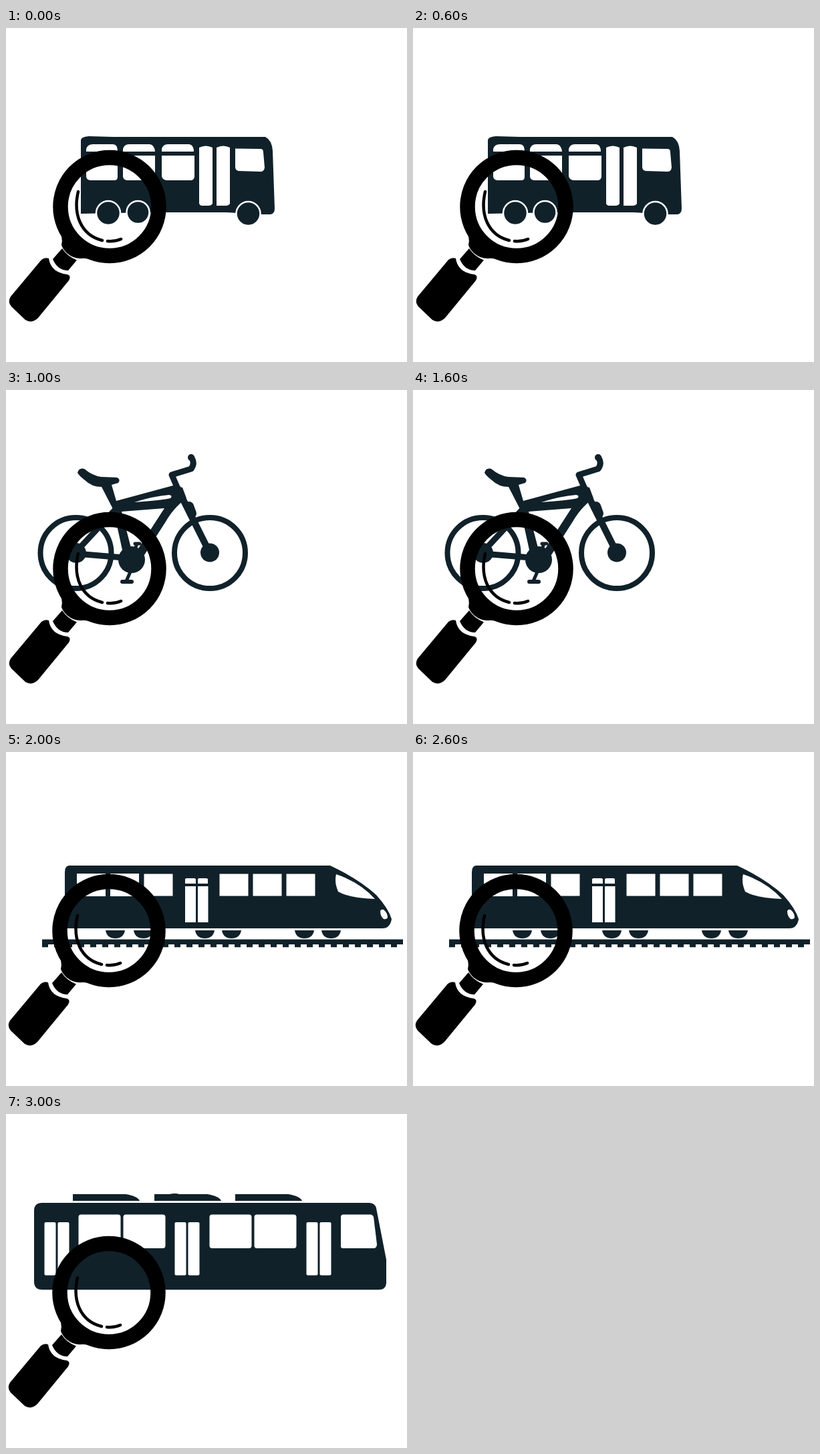
An HTML page that plays this animation: 600x500 px, repeating every 4 s.

```html
<!DOCTYPE html>
<html lang="en">
<head>
<meta charset="utf-8">
<title>Vehicle search</title>
<style>
  html, body { margin: 0; width: 100%; height: 100%; overflow: hidden; background: #fff; }
  svg { display: block; width: 600px; height: 500px; }
  .scene { fill: #11212a; visibility: hidden; }
  .w { fill: #fff; }
  .line { fill: none; stroke: #11212a; stroke-linecap: round; stroke-linejoin: round; }
</style>
</head>
<body>
<svg viewBox="0 0 600 500">
  <g class="scene" id="bus">
    <path d="M112 168Q112 163 124 162L160 163H388Q398 168 399 184L402 270Q402 278 396 279H380L330 276H215L112 278Z"/>
    <g class="w">
      <path d="M120 185V181Q122 174 130 174H160Q167 174 167 185ZM175 185V181Q177 174 184 174H215Q222 175 223 185ZM233 185V181Q235 174 242 174H274Q281 175 281 185Z"/>
      <path d="M120 191H167V223Q167 228 162 228H126Q120 227 120 222ZM175 191H223V223Q223 228 218 228H181Q175 227 175 222ZM233 191H282V223Q281 228 276 228H240Q234 227 233 222Z"/>
      <path d="M289 179Q299 174 309 179V263Q307 266 303 266H293Q289 265 289 262ZM315 179Q325 174 335 179V263Q333 266 329 266H315Z"/>
      <path d="M343 180.500L381 181Q385 181 385 186L387 209Q386 215 381 215L348 214Q343 213 343 208Z"/>
    </g>
    <g stroke="#fff" stroke-width="2.500">
      <circle cx="153" cy="277" r="18"/>
      <circle cx="197.500" cy="276" r="17"/>
      <circle cx="362.500" cy="278" r="18"/>
    </g>
  </g>

  <g class="scene" id="bike">
    <g class="line" stroke-width="8">
      <circle cx="104.500" cy="244" r="53"/>
      <circle cx="305" cy="244" r="53"/>
      <path d="M105 245L188 252M105 242L170 172" stroke-width="9"/>
      <path d="M278 102Q283 110 277 118L248 127L258 150" stroke-width="9"/>
      <path d="M257 148L303 240" stroke-width="10"/>
      <path d="M274 174L278 185" stroke-width="14"/>
      <path d="M193 230H200M195 233L190 245M187 270L180 286" stroke-width="5"/>
      <path d="M174 287H188" stroke-width="6"/>
    </g>
    <circle cx="277" cy="101" r="5"/>
    <path d="M107 124Q109 116 117 118Q129 128 142 130L166 131Q172 134 168 139L158 142L165 166L250 143L264 146L270 162Q251 176 239 197L207 247L195 242L237 177L173 182L188 240L175 244L161 180L143 145Q128 145 118 135Q109 128 107 124Z"/>
    <path class="w" d="M192 168Q220 159 244 157Q250 158 246 162Q234 165 192 168Z"/>
    <circle cx="105" cy="244" r="15"/>
    <circle cx="305" cy="243.500" r="14"/>
    <ellipse cx="188" cy="254" rx="20" ry="20"/>
  </g>

  <g class="scene" id="train">
    <path d="M94 170H485Q528 190 554 214Q572 234 577 250Q575 264 563 264H88V180Q88 171 94 170Z"/>
    <g class="w">
      <path d="M106 182H149V216H106ZM156 182H199V216H156ZM206.500 182.500H249.500V215.500H206.500ZM319.500 182.500H362.500V215.500H319.500ZM369.500 182.500H412.500V215.500H369.500ZM419.500 182.500H462.500V215.500H419.500Z"/>
      <path d="M268 197V190L270 189H282L284 190V197ZM287 197V190L289 189H300L302 190V197ZM268 201H284V255H268ZM287 201H302.500V255H287Z"/>
      <path d="M494 183Q530 195 552 220Q514 219 497 209Q491 195 494 183Z"/>
      <path d="M560 238Q561 235 565 236Q571 241 571 248Q569 251 565 250Q560 246 560 238Z"/>
    </g>
    <path id="axles"/>
    <path d="M54 280.500H594V288H54Z"/>
    <path d="M54 290H594" fill="none" stroke="#11212a" stroke-width="4.500" stroke-dasharray="9"/>
  </g>

  <g class="scene" id="tram">
    <path d="M54 133H543Q552 133 554 141L569 218V252Q569 263 558 263H54Q42 263 42 251V145Q42 133 54 133Z"/>
    <path d="M100 120H179Q197 123 200 130H100ZM222 120H245Q252 118 259 120H301Q319 123 322 130H222ZM343 120H422Q440 123 443 130H343Z"/>
    <g class="w" id="panes">
      <path d="M504 150.500H546Q549 151 550 154L555 195Q555 200 551 201H504Q501 201 501 198V154Q501 151 504 150.500Z"/>
    </g>
  </g>

  <g id="lens">
    <circle cx="155" cy="267.500" r="73.500" fill="none" stroke="#000" stroke-width="22.500"/>
    <path d="M78 300Q86 312 83 325Q85 331 91 337Q102 346 113 345Q121 344 130 348L116 326L93 300Z"/>
    <path d="M84 330Q92 342 106 347.500L93 363Q77 363 70 346Z"/>
    <path d="M53 347Q58 343 64 345Q67 366 92 369Q98 371 94 378L48 434Q39 443 29 437L8 417Q2 410 7 402Z"/>
    <path d="M108 245C100 279 112 310 144 318M152 319Q163 320 172 316" fill="none" stroke="#000" stroke-width="4.500" stroke-linecap="round"/>
  </g>
</svg>
<script>
  const get = id => document.getElementById(id);

  get("axles").setAttribute("d", [163.5, 205.5, 297.5, 337.5, 446.5, 486.5]
    .map(x => `M${x - 14.5} 267h29q-2 12-14.5 12t-14.5-12z`).join(""));

  const pane = (x, y, w, h, r) => `<rect x="${x}" y="${y}" width="${w}" height="${h}" rx="${r}"/>`;
  get("panes").innerHTML +=
    [57.5, 77.5, 252.5, 272.5, 449.5, 469.5].map(x => pane(x, 162, 17, 79.5, 2)).join("") +
    [108.5, 175.5, 304.5, 371.5].map(x => pane(x, 150.5, 63, 50.5, 4)).join("");

  const scenes = document.querySelectorAll(".scene");
  function draw(now) {
    const step = Math.floor(now / 1000) % 4;
    scenes.forEach((s, i) => s.style.visibility = i === step ? "visible" : "hidden");
    get("lens").setAttribute("transform", `translate(${step > 1 ? -1 : 0})`);
    requestAnimationFrame(draw);
  }
  draw(performance.now());
</script>
</body>
</html>
```
